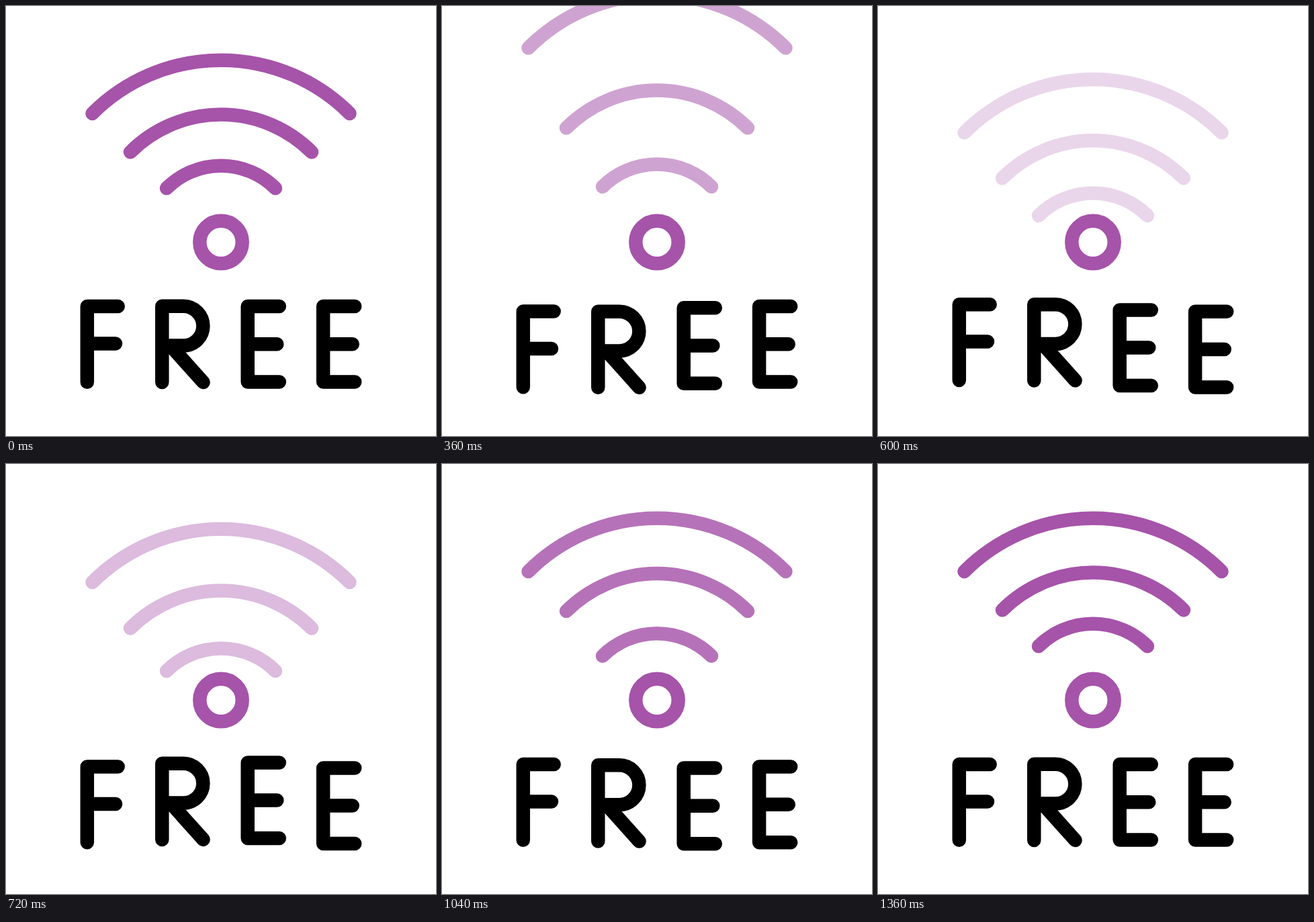
An HTML page for the animation above (1480 ms loop, 640 px wide and 640 px high).

```html
<!DOCTYPE html>
<html lang="en">
<head>
<meta charset="utf-8">
<title>Free Wi-Fi</title>
<style>
  html, body { margin: 0; width: 100%; height: 100%; overflow: hidden; background: #fff; }
  svg { display: block; width: 100%; height: 100%; }
  path, circle { fill: none; stroke-width: 20.5; stroke-linecap: round; stroke-linejoin: round; }
  .signal { stroke: #a653aa; }
  .word { stroke: #000; }
</style>
</head>
<body>
<svg viewBox="0 0 640 640">
  <defs>
    <path id="outer" d="M128.5 160A270.8 270.8 0 0 1 511.5 160"/>
    <path id="middle" d="M185 217.5A190.9 190.9 0 0 1 455 217.5"/>
    <path id="inner" d="M239 271.3A114.6 114.6 0 0 1 401 271.3"/>
    <path id="e" d="M406.8 447H359.7V559.6H406.8M359.7 503.2H403.3"/>
  </defs>
  <g class="signal">
    <g id="arriving"><use href="#outer"/><use href="#middle"/><use href="#inner"/></g>
    <g id="leaving"><use href="#outer"/><use href="#middle"/><use href="#inner"/></g>
    <circle cx="320" cy="351.5" r="31.7"/>
  </g>
  <g class="word" id="word">
    <path d="M166.7 447H120.8V559.7M120.8 502.4H163"/>
    <path d="M232.3 560V446.8H264A29.4 29.4 0 0 1 264 505.6H232.3M247 508L293.6 560"/>
    <use href="#e"/>
    <g><use href="#e" x="112.4"/></g>
  </g>
</svg>
<script>
  const LOOP = 1480, STEP = 40, TRAVEL = 800, SWING = 240;
  const arriving = document.getElementById('arriving');
  const leaving = document.getElementById('leaving');
  const letters = [...document.getElementById('word').children];

  // [start, distance] for the outer, middle and inner arc
  const rise = [[80, 346], [200, 346], [320, 320]];
  const settle = [[200, 57], [320, 54], [560, 41]];
  const letterStart = [80, 160, 280, 400];
  const swings = [0, 8.5, -3.5, 6, 0];

  const ramp = (t, from, to) => Math.min(1, Math.max(0, (t - from) / (to - from)));
  const ease = s => s * s * (3 - 2 * s);
  const travel = (t, start) => ease(ramp(t, start, start + TRAVEL));
  const shift = (el, y) => el.setAttribute('transform', `translate(0 ${y.toFixed(2)})`);

  function bob(t) {
    let y = 0;
    for (let i = 1; i < swings.length; i++) {
      y += (swings[i] - swings[i - 1]) * ease(ramp(t, (i - 1) * SWING, i * SWING));
    }
    return y;
  }

  function draw(t) {
    leaving.setAttribute('opacity', 1 - ramp(t, 155, 598));
    arriving.setAttribute('opacity', ramp(t, 420, 1180));
    rise.forEach(([start, d], i) => shift(leaving.children[i], -d * travel(t, start)));
    settle.forEach(([start, d], i) => shift(arriving.children[i], d * (1 - travel(t, start))));
    letters.forEach((el, i) => shift(el, bob(t - letterStart[i])));
  }

  const begin = performance.now();
  function tick() {
    const t = (performance.now() - begin) % LOOP;
    draw(Math.floor(t / STEP) * STEP);
    requestAnimationFrame(tick);
  }
  tick();
</script>
</body>
</html>
```
